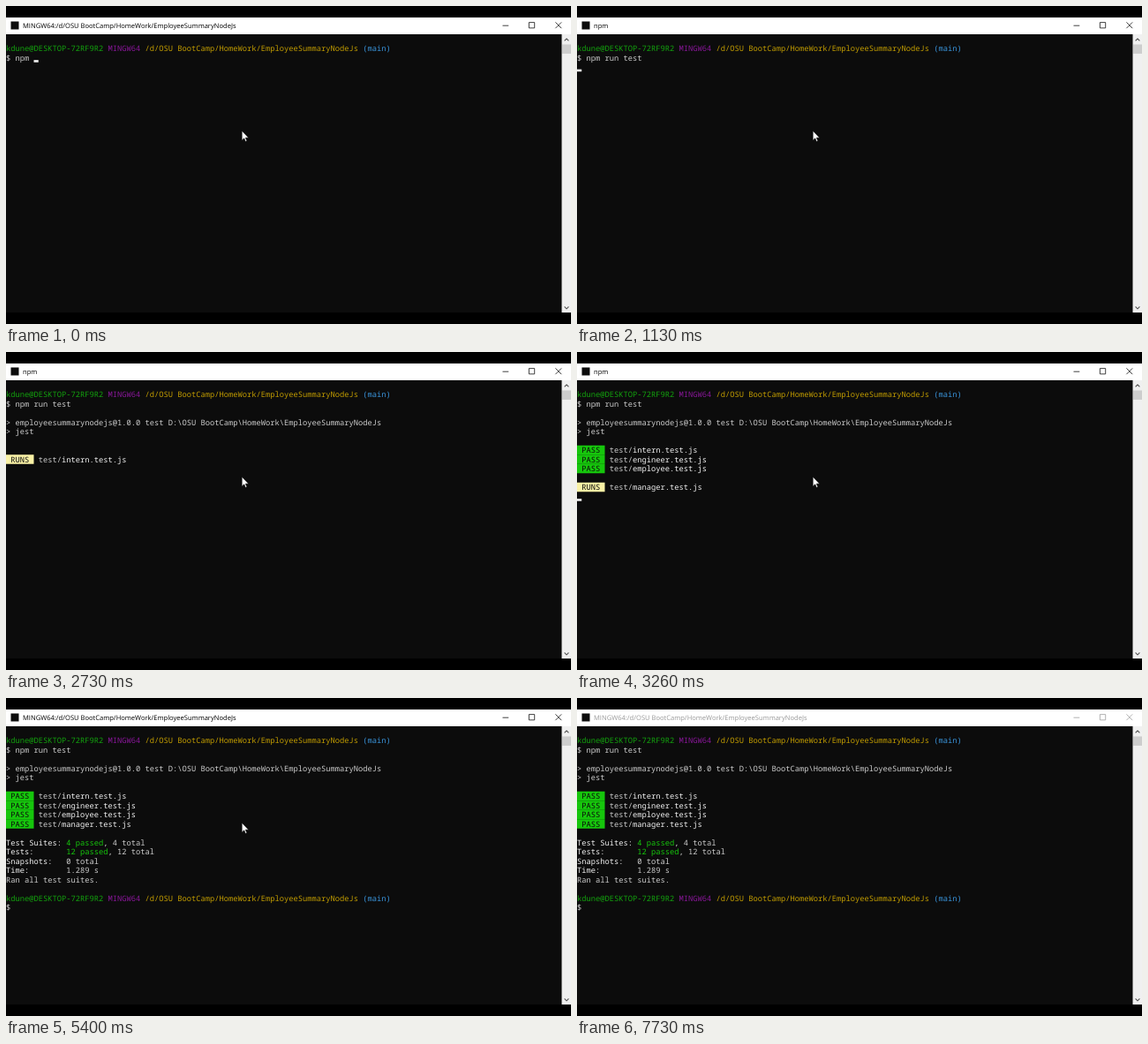
Animation, 640 px wide and 360 px high, one loop 7.8 s. Source, as an HTML page:

```html
<!DOCTYPE html>
<html lang="en">
<head>
<meta charset="utf-8">
<title>Terminal test run</title>
<style>
  html, body { margin: 0; width: 100%; height: 100%; overflow: hidden; background: #000; }
  svg { display: block; width: 100vw; height: 100vh; }
  text { white-space: pre; text-rendering: geometricPrecision; }
  #lines { font: 8.75px "Noto Sans Mono", "DejaVu Sans Mono", monospace; }
  #title { font: 7.57px "Open Sans", "Noto Sans", sans-serif; }
  #bar { fill: #000; stroke: none; }
  #bar path { fill: none; stroke: #000; stroke-width: .75; }
  #bar.idle { fill: #999; }
  #bar.idle path { stroke: #999; }
</style>
</head>
<body>
<svg viewBox="0 0 640 360">
  <rect width="640" height="360"/>
  <rect y="32" width="630" height="315" fill="#0c0c0c"/>
  <rect y="13" width="640" height="19" fill="#fff"/>
  <rect x="5.5" y="17.5" width="9" height="9" fill="#0c0c0c"/>
  <g id="bar">
    <text id="title" x="19" y="24.7"></text>
    <path d="M562.5 22.2h6.8M592.4 18.6h6.3v6.3h-6.3zM622.4 18.4l6.8 6.8m0-6.8l-6.8 6.8"/>
  </g>
  <rect x="629.5" y="32" width="10.5" height="315" fill="#f0f0f0"/>
  <rect x="630" y="43.5" width="10" height="10.5" fill="#cdcdcd"/>
  <path d="M632.6 39.4l2.4-2.4 2.4 2.4M632.6 340.4l2.4 2.4 2.4-2.4" fill="none" stroke="#505050" stroke-width="1.1"/>
  <g id="lines"></g>
  <rect id="caret" width="5.25" height="2.6" fill="#f2f2f2"/>
  <path id="mouse" d="M0 0V11L2.5 8.6 4.1 12.3 5.7 11.6 4.1 8H7.6Z" fill="#fff" stroke="#000" stroke-width=".6"/>
</svg>
<script>
const LOOP = 7800, CELL = 5.25, ROW = 10.5, TOP = 42.75;
const C = {
  text: '#cccccc', white: '#f2f2f2', dark: '#0c0c0c', green: '#13a10e', lime: '#16c60c',
  purple: '#881798', gold: '#c19c00', blue: '#3a96dd', cream: '#f9f1a5'
};
const PATH = '/d/OSU BootCamp/HomeWork/EmployeeSummaryNodeJs';
const $ = id => document.getElementById(id);
const items = [];

function make(tag, attrs, parent, text = '') {
  const el = document.createElementNS('http://www.w3.org/2000/svg', tag);
  for (const k in attrs) el.setAttribute(k, attrs[k]);
  el.textContent = text;
  return parent.appendChild(el);
}

// One line of coloured parts, visible from one time to another.
function line(row, from, parts, to = LOOP, badge) {
  const g = make('g', {}, $('lines')), y = TOP + row * ROW;
  if (badge) make('rect', { y, width: 6 * CELL, height: ROW, fill: badge }, g);
  const text = make('text', { x: 0, y: y + 8.35 }, g);
  for (const [str, fill] of parts) make('tspan', { fill }, text, str);
  items.push({ g, from, to });
}

function prompt(row, from) {
  line(row, from, [
    ['kdune@DESKTOP-72RF9R2 ', C.green], ['MINGW64 ', C.purple],
    [PATH + ' ', C.gold], ['(main)', C.blue]
  ]);
  line(row + 1, from, [['$ ', C.text]]);
}

function suite(row, from, state, name, to) {
  line(row, from, [[` ${state} `, C.dark], [' test/', C.text], [name + '.test.js', C.white]],
    to, state === 'PASS' ? C.lime : C.cream);
}

prompt(0, 0);
line(3, 1530, [['> employeesummarynodejs@1.0.0 test D:\\OSU BootCamp\\HomeWork\\EmployeeSummaryNodeJs', C.text]]);
line(4, 1530, [['> jest', C.text]]);

const runTimes = [2000, 3060, 3130, 3200, 3330];
['intern', 'engineer', 'employee', 'manager'].forEach((name, i) => {
  suite(7 + i, runTimes[i], 'RUNS', name, runTimes[i + 1]);
  suite(6 + i, runTimes[i + 1], 'PASS', name);
});

const DONE = 3330, BACK = 3460;
line(11, DONE, [['Test Suites: ', C.white], ['4 passed', C.lime], [', 4 total', C.text]]);
line(12, DONE, [['Tests:       ', C.white], ['12 passed', C.lime], [', 12 total', C.text]]);
line(13, DONE, [['Snapshots:   ', C.white], ['0 total', C.text]]);
line(14, DONE, [['Time:        ', C.white], ['1.289 s', C.text]]);
line(15, DONE, [['Ran all test suites.', C.text]]);
prompt(17, BACK);

// Typed command
const command = 'npm run test', keys = [60, 130, 200, 330, 400, 460, 600, 660];
const typed = make('text', { x: 2 * CELL, y: TOP + ROW + 8.35, fill: C.text }, $('lines'));

// Caret moves: time, row, column
const moves = [[800, 2, 0], [1530, 5, 0], [1600, 6, 0], [2000, 8, 0], [3060, 9, 0],
  [3130, 10, 0], [3200, 11, 0], [DONE, 16, 0], [BACK, 18, 2]];
const blinks = [2730, 3260, 4330, 4860, 5400, 5930, 6460, 7000, 7530];
const passed = (times, t) => times.filter(x => x <= t).length;

function draw(t) {
  for (const { g, from, to } of items) g.style.display = t >= from && t < to ? '' : 'none';

  const count = 4 + passed(keys, t);
  typed.textContent = command.slice(0, count);

  const [, row, col] = moves.filter(m => m[0] <= t).pop() || [0, 1, 2 + count];
  $('caret').setAttribute('x', col * CELL);
  $('caret').setAttribute('y', TOP + (row + 1) * ROW - 2.6);
  $('caret').style.display = passed(blinks, t) % 2 ? 'none' : '';

  $('title').textContent = t >= 870 && t < BACK ? 'npm' : 'MINGW64:' + PATH;
  $('bar').setAttribute('class', t >= 7730 ? 'idle' : '');

  // The pointer leaves in steps of 1/15 s.
  const step = t < 6130 ? 0 : Math.floor((t - 6130) / 67) + 1;
  const p = Math.min(step / 7, 1), e = p * p * (3 - 2 * p);
  $('mouse').setAttribute('transform', `translate(${267.2 + 133 * e} ${141.2 + 188 * e})`);
  $('mouse').style.display = t >= 6600 ? 'none' : '';
}

const start = performance.now();
function tick() {
  draw((performance.now() - start) % LOOP);
  requestAnimationFrame(tick);
}
tick();
</script>
</body>
</html>
```
